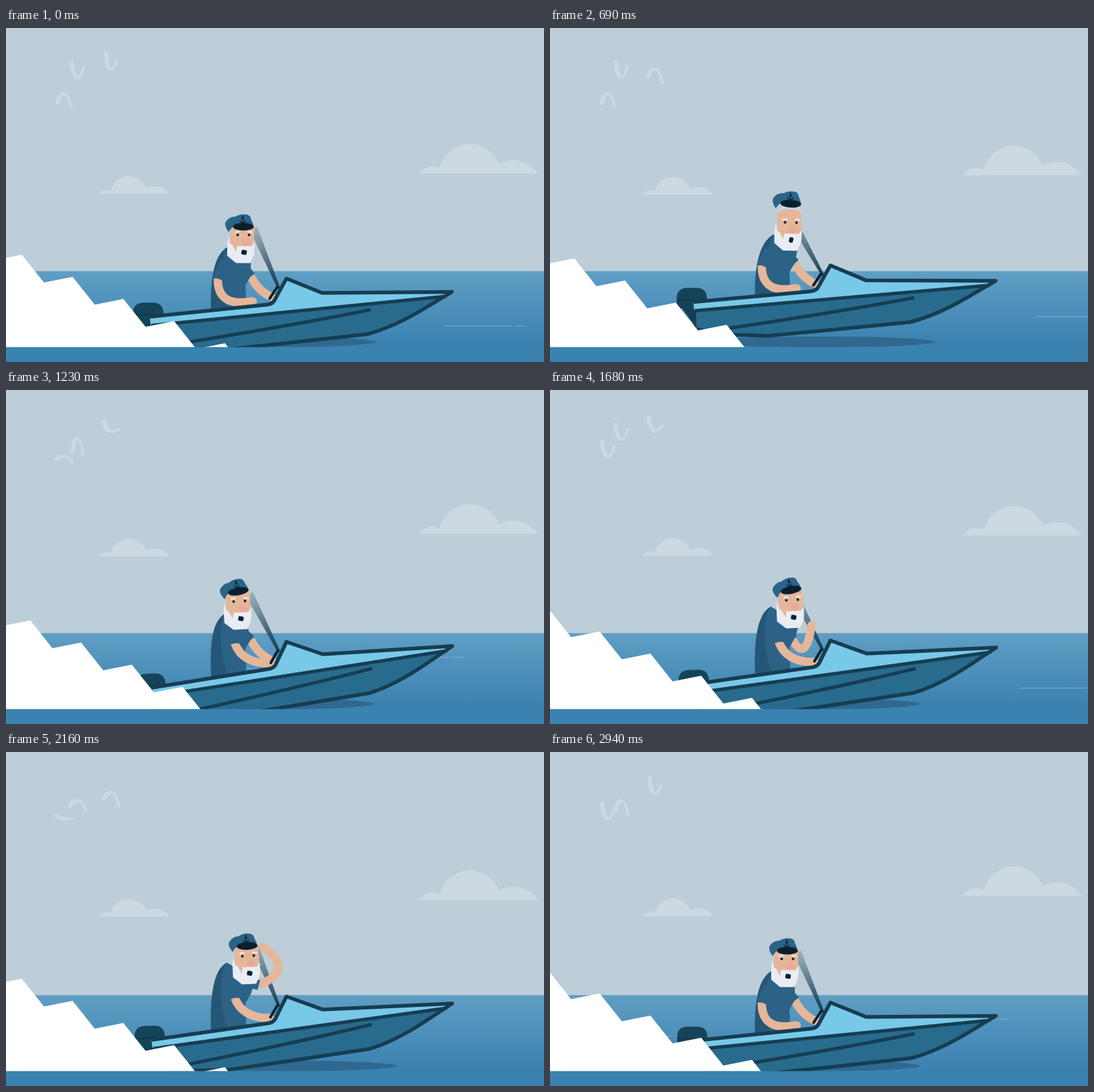
Recreate the animation shown at these times as an HTML page with a canvas. Size 800 by 498 pixels, loop 2970 ms.

```html
<!DOCTYPE html>
<html lang="en">
<head>
<meta charset="utf-8">
<title>Captain in a speedboat</title>
<style>
html, body { margin: 0; width: 100%; height: 100%; overflow: hidden; background: #bdced8; }
canvas { display: block; }
</style>
</head>
<body>
<canvas id="stage" width="800" height="498"></canvas>
<script>
const c = document.getElementById('stage').getContext('2d');
const LOOP = 2970, STEP = 30, TAU = Math.PI * 2, RAD = Math.PI / 180;
const INK = '#163d52', NIGHT = '#0b202e', SHIRT = '#2d6287', SKIN = '#e5b699';
const PALE = '#cdd9e2', BEARD = '#e9edf3';

const mix = (a, b, u) => a + (b - a) * u;
const mixAll = (a, b, u) => a.map((v, i) => mix(v, b[i], u));
const wave = (t, peak, period) => Math.cos(TAU * (t - peak) / period);
const noise = n => { const v = Math.sin(n * 12.9898) * 43758.5453; return v - Math.floor(v); };

function ramp(t, from, to) {
  const u = Math.min(1, Math.max(0, (t - from) / (to - from)));
  return u * u * (3 - 2 * u);
}
// Smooth rise and fall around a peak
const bump = (t, peak, half) => ramp(t, peak - half, peak) - ramp(t, peak, peak + half);

function poseAt(t) {
  const brace = bump(t, 360, 330), hop = bump(t, 690, 270);
  const dip = bump(t, 1230, 350), swell = bump(t, 2160, 400);
  const grip = ramp(t, 750, 1200) - ramp(t, 2350, 2850);
  const salute = ramp(t, 1230, 2130) - ramp(t, 2250, 2800);
  const lean = Math.min(1, salute * 2);
  const y = 373.5 + 6.5 * brace - 19.5 * hop + 2 * dip - 9 * swell;
  return {
    y, grip, salute, lean,
    tilt: 1.9 * brace + .7 * hop - dip - 2.2 * grip,
    shade: 550 - 5 * brace + 23 * hop - 2 * dip + 31 * swell,
    mast: 23 + 6 * hop + 4 * grip - 5 * swell,
    headX: 353 + 2 * brace + 5 * hop - 6 * grip + 13 * lean,
    headY: y - 65 - brace + hop + 4.5 * grip,
    nod: 2 * brace + hop - 3 * grip,
    hatX: -1.5 * grip,
    hatY: -12.3 - 15.7 * hop - 2.5 * grip,
    hatTilt: -4 * brace + 3 * hop - 10 * grip + 7 * swell,
    mouthW: 8 - 2 * hop,
    mouthH: 7 - 4.5 * brace + hop
  };
}

function fill(path, color) {
  c.fillStyle = color;
  c.fill(new Path2D(path));
}
function line(path, width, color, cap = 'round') {
  c.strokeStyle = color;
  c.lineWidth = width;
  c.lineCap = cap;
  c.lineJoin = 'round';
  c.stroke(new Path2D(path));
}
function oval(x, y, rx, ry, color) {
  c.fillStyle = color;
  c.beginPath();
  c.ellipse(x, y, rx, ry, 0, 0, TAU);
  c.fill();
}
function placed(x, y, deg, draw) {
  c.save();
  c.translate(x, y);
  c.rotate(deg * RAD);
  draw();
  c.restore();
}

function cloud(x, y, size) {
  placed(x, y, 0, () => {
    c.scale(size, size);
    fill('M0 0C8-10 21-14 32-8A46 46 0 0 1 120-14C139-25 164-20 178 0Z', PALE);
  });
}

function bird(x, y, flap, skew) {
  const reach = Math.sqrt(1 - .75 * flap * flap);
  const lx = -12.5 * reach, rx = 13.5 * reach;
  const ly = 25 * flap - 3, ry = 23 * flap + skew, s = flap < 0 ? 3 : -3;
  placed(x, y, 0, () => fill(
    `M${lx - 3} ${ly}Q${lx * .9 - 2} ${s} 0 ${s}Q${rx * .7} ${s} ${rx + 3} ${ry}` +
    `L${rx - 2} ${ry}Q${rx * .5} ${-s} 1 ${-s / 2}Q${lx * .4} ${-s} ${lx + 3} ${ly}Z`, PALE));
}

// Dashes with a short tail, rushing left now and then
function streaks(t) {
  c.fillStyle = 'rgba(165,205,226,.55)';
  for (let i = 1; i <= 6; i++) {
    const x = 800 - (1.52 * t + 2600 * noise(i)) % 2600;
    const y = Math.round(386 + 88 * noise(i + 20));
    c.fillRect(x, y, 101, 1);
    c.fillRect(x + 105, y, 17, 1);
  }
}

function mast(p) {
  placed(406, p.y + 15, -p.mast, () => {
    const glass = c.createLinearGradient(0, 0, 0, -98);
    glass.addColorStop(0, 'rgba(22,61,82,1)');
    glass.addColorStop(.5, 'rgba(45,80,100,.7)');
    glass.addColorStop(1, 'rgba(70,105,122,.3)');
    fill('M-2 0L-6-96L6-98L2 0Z', glass);
  });
}

// Arm poses: sleeve end, elbow, hand; heights count from the windscreen top
const LAP = [315, 0, 314, 44, 367, 34], WHEEL = [340, 2, 352, 33, 393, 32];
const STEER = [364, -3, 376, 20, 396, 28], BROW = [376, -17, 431, -40, 382, -74];

function arm([x0, y0, x1, y1, x2, y2], y, shoulderX, shoulderY) {
  line(`M${x0} ${y + y0}Q${x1} ${y + y1} ${x2} ${y + y2}`, 12.5, SKIN, 'butt');
  oval(x2, y + y2, 6, 6, SKIN);
  line(`M${shoulderX} ${shoulderY}L${x0} ${y + y0}`, 15, SHIRT, 'butt');
}

function torso(p) {
  const y = p.y, nx = 330 + (p.headX - 354) * .5 - 5 * p.lean, ny = p.headY + 18 - 8 * p.lean;
  const front = `L357 ${y + 46}L356 ${y + 10}L364 ${y - 4}L${p.headX + 11} ${p.headY + 34}Z`;
  const far = mixAll(STEER, BROW, p.salute), swing = Math.sin(Math.PI * p.salute);
  far[0] -= 10 * swing;
  far[1] += 8 * swing;
  far[2] -= 23 * swing;
  far[3] += 45 * swing;
  arm(far, y, 350, ny + 27);
  fill(`M${nx} ${ny}C${nx - 20} ${ny + 11} 303 ${y} 305 ${y + 52}` + front, '#265676');
  fill(`M${nx} ${ny}C${nx - 14} ${ny + 25} 320 ${y + 25} 330 ${y + 50}` + front, SHIRT);
  arm(mixAll(LAP, WHEEL, p.grip), y, mix(326, 341, p.grip), ny + 23);
}

function hat() {
  fill('M-22 8Q-28 0-27-6Q-22-15-12-15Q-4-20 6-18Q11-16 11-12L15-3L-8-3Q-16-2-22 8Z', '#2a6488');
  oval(0, 0, 15.5, 5.8, NIGHT);
  line('M-1-14V-7M-3-12H1M-5-9Q-4-6-1-6Q2-6 3-9', 1.2, NIGHT);
  oval(-1, -15, 1.3, 1.3, NIGHT);
}

function head(p) {
  placed(p.headX, p.headY, p.nod, () => {
    fill('M-19-13Q-18-26 0-26Q15-26 16-13Z', '#c8d5dc');
    fill('M-20-10Q-19-18-8-19H8Q15-18 16-10V24H-20Z', SKIN);
    fill('M-22 1L-24 12V31L-11 42H10L16 29L17 10L13 16L8 20L0 18L-9 16L-11 25L-17 14L-20 13Z', BEARD);
    oval(4, 11, 6.5, 5.5, '#e7aa99');
    fill('M-10 20Q-4 15 3 17Q10 15 14 20L12 24H-9Z', BEARD);
    line('M-12-4L-6-5M7-5L13-4', 2.2, BEARD);
    for (const x of [-8.5, 8.5]) oval(x, 0, 2, 2, '#102431');
    placed(1, 26, 12, () => {
      c.fillStyle = NIGHT;
      c.beginPath();
      c.roundRect(-p.mouthW / 2, -p.mouthH / 2, p.mouthW, p.mouthH, Math.min(2, p.mouthH / 2));
      c.fill();
    });
  });
  placed(p.headX + p.hatX, p.headY + p.hatY, p.hatTilt, hat);
}

function inBoat(p, draw) {
  placed(417, p.y, p.tilt, () => {
    c.translate(-417, -373);
    draw();
  });
}

function engine() {
  fill('M190 430L217 466L226 430Z', '#153f54');
  fill('M189 440V425Q189 409 205 409H218Q234 409 234 425V440Z', '#154459');
  line('M191 427H234', 2, '#12374a');
}

function boat() {
  const top = 'M214 430L388 412Q396 411 399 406L417 373L470 394.5L663 393';
  const keel = 'L620 419Q575 446 537 456L410 470L326 479L262 478L216 470';
  fill('M215 442L663 393' + keel + 'Z', '#286b8c');
  fill(top + 'L655 399.5L215 443Z', '#78c8e8');
  line('M216 443L655 399.5', 5, INK, 'butt');
  line('M540 420Q431 442 270 468', 5, INK);
  line('M216 444L217 472', 4, INK);
  line(top + keel, 5.5, INK, 'butt');
}

// Sawtooth spray sliding up to the left
function foam(t) {
  const shift = 1 - t / 180 % 1;
  let path = 'M-300 600';
  for (let i = -3; i < 6; i++) {
    const x = 23.5 + 75.5 * (i + shift), y = 338 + 33 * (i + shift);
    path += `L${x} ${y}L${x + 33} ${y + 41.5}`;
  }
  fill(path + 'L400 600Z', '#fff');
}

function draw(now) {
  const t = Math.floor(now % LOOP / STEP) * STEP;
  const p = poseAt(t);

  c.fillStyle = '#bdced8';
  c.fillRect(0, 0, 800, 498);
  cloud(137, 246.6 + 2 * wave(t, 750, 4000), .595);
  cloud(613, 217.4 + 3.1 * wave(t, 460, 1700), 1);
  bird(106, 73, wave(t, 340, 840), 3);
  bird(156, 61, .8 * wave(t, 720, 1560) - .15, 8);
  bird(86, 99, -.8 * wave(t, 360, 650) - .05, 3);

  const sea = c.createLinearGradient(0, 363, 0, 472);
  sea.addColorStop(0, '#609ec4');
  sea.addColorStop(1, '#3a82b0');
  c.fillStyle = sea;
  c.fillRect(0, 362.5, 800, 136);

  c.save();
  c.beginPath();
  c.rect(0, 0, 800, 475.7);
  c.clip();
  oval((p.shade + 230) / 2, 468, (p.shade - 230) / 2, 8, '#30688f');
  streaks(t);
  inBoat(p, engine);
  mast(p);
  torso(p);
  head(p);
  inBoat(p, () => {
    line('M392 403L403 386', 4, NIGHT);
    boat();
  });
  foam(t);
  c.restore();
  requestAnimationFrame(draw);
}
requestAnimationFrame(draw);
</script>
</body>
</html>
```
